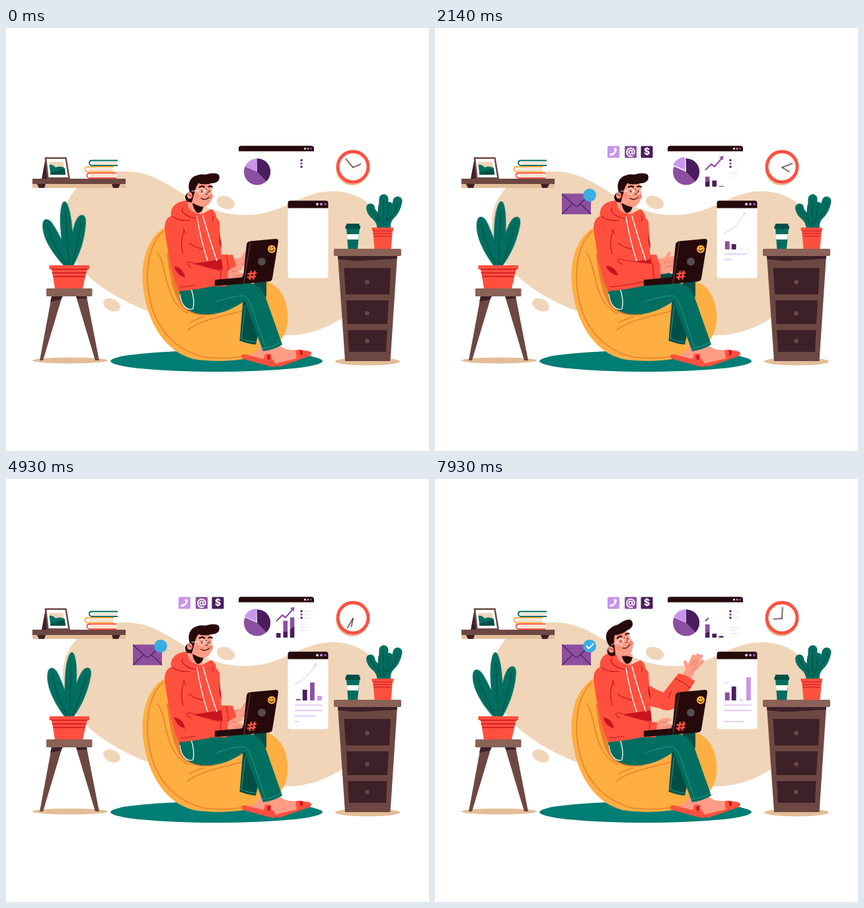
An HTML page without scripts that plays this animation: 640 by 640 pixels, repeating every 8000 ms.

```html
<!DOCTYPE html>
<html lang="en">
<head>
<meta charset="utf-8">
<title>Working from home</title>
<style>
html, body { margin: 0; width: 100%; height: 100%; overflow: hidden; background: #fff; }
svg { display: block; width: 100vw; height: 100vh; }
svg {
  --red: #ff503f; --deep: #c8141f; --skin: #ff9c85; --ink: #260a0b;
  --green: #006e60; --dark: #004f47; --brown: #6d4842; --wood: #3d2028;
  --tan: #e4bd98; --sand: #f0d5b8; --gold: #ffae42; --rust: #ec7f2b;
  --plum: #4a1d5e; --violet: #8c4f9f; --lilac: #c795ea; --pale: #e9d3fa;
}
.red { fill: var(--red); } .deep { fill: var(--deep); } .skin { fill: var(--skin); }
.ink { fill: var(--ink); } .green { fill: var(--green); } .dark { fill: var(--dark); }
.brown { fill: var(--brown); } .wood { fill: var(--wood); } .tan { fill: var(--tan); }
.sand { fill: var(--sand); } .gold { fill: var(--gold); } .white { fill: #fff; }
.plum { fill: var(--plum); } .violet { fill: var(--violet); } .lilac { fill: var(--lilac); }
.l { fill: none; stroke-linecap: round; stroke-linejoin: round; }
.fold { stroke: var(--deep); stroke-width: 1.2; }
.crease { stroke: var(--rust); stroke-width: 1.6; }
.vein { stroke: var(--dark); stroke-width: 1.2; }
.seam { stroke: #24998a; stroke-width: 1; }
.line { stroke: var(--ink); stroke-width: 1.2; }

.leaves, .hand, .pop, .mail, .slice, .arm, .elbow, .near, .head,
.grow, .trace, .tip, .tip2, .tick { animation: 8s linear infinite; }

/* Bars and text lines: --b to --g are lengths at the key times. */
.grow { fill: none; animation-name: grow; animation-timing-function: ease-in-out; }
@keyframes grow {
  0%, 7% { stroke-dasharray: 0 99px; }
  17.9% { stroke-dasharray: calc(var(--b, 0) * 1px) 99px; }
  36.6% { stroke-dasharray: calc(var(--c, 0) * 1px) 99px; }
  53.6% { stroke-dasharray: calc(var(--d, 0) * 1px) 99px; }
  69.6% { stroke-dasharray: calc(var(--e, 0) * 1px) 99px; }
  83.9% { stroke-dasharray: calc(var(--f, 0) * 1px) 99px; }
  99.1%, 100% { stroke-dasharray: calc(var(--g, 0) * 1px) 99px; }
}

.leaves { animation-name: sway; transform-origin: 96px 362px; }
@keyframes sway {
  0% { transform: rotate(-4.4deg); animation-timing-function: cubic-bezier(.37, 0, .63, 1); }
  43.75% { transform: rotate(5.8deg); animation-timing-function: cubic-bezier(.37, 0, .63, 1); }
  87.5% { transform: rotate(-4.4deg); animation-timing-function: cubic-bezier(.33, 0, .67, .33); }
  100% { transform: rotate(-2.6deg); }
}

.hand { animation-name: turn; transform-origin: 525px 211px; }
@keyframes turn {
  from { transform: rotate(var(--from)); }
  to { transform: rotate(var(--to)); }
}

.pop { animation-name: pop; transform-box: fill-box; transform-origin: center; }
.p1 { animation-name: pop1; } .p2 { animation-name: pop2; }
@keyframes pop { 0%, 7% { transform: scale(0); } 11.5%, 100% { transform: none; } }
@keyframes pop1 { 0%, 10% { transform: scale(0); } 14.5%, 100% { transform: none; } }
@keyframes pop2 { 0%, 13.5% { transform: scale(0); } 18.5%, 100% { transform: none; } }

.mail { animation-name: mail; }
@keyframes mail {
  0%, 17% { opacity: 0; transform: translateY(34px); animation-timing-function: ease-in-out; }
  27%, 100% { opacity: 1; transform: none; }
}
.tick { animation-name: tick; stroke-dasharray: 100 200; }
@keyframes tick { 0%, 67.5% { stroke-dashoffset: 101; } 72.5%, 100% { stroke-dashoffset: 0; } }

.slice { animation-name: slice; animation-timing-function: ease-in-out; }
@keyframes slice {
  0%, 9% { transform: none; }
  16.5%, 58% { transform: translate(-1.4px, -2.4px); }
  66%, 97% { transform: none; }
  100% { transform: translate(-.4px, -.7px); }
}

.trace { fill: none; animation-name: trace; stroke-dasharray: 100 200; }
@keyframes trace {
  0%, 8.4%, 85.1%, 96% { stroke-dashoffset: 100; }
  24.8%, 63.75% { stroke-dashoffset: 0; }
  85% { stroke-dashoffset: -100; }
  100% { stroke-dashoffset: 75; }
}
.tip { animation-name: tip; } .tip2 { animation-name: tip2; }
@keyframes tip { 0%, 23% { opacity: 0; } 25%, 84% { opacity: 1; } 85%, 100% { opacity: 0; } }
@keyframes tip2 { 0%, 23% { opacity: 0; } 25%, 80% { opacity: 1; } 82%, 100% { opacity: 0; } }

.arm { animation-name: arm; animation-timing-function: ease-in-out; }
.elbow { animation-name: elbow; animation-timing-function: ease-in-out; transform-origin: 350px 340px; }
@keyframes arm {
  0%, 2% { transform: translate(-55px, 16px); }
  9%, 55% { transform: translate(-63px, 16px); }
  62%, 80% { transform: translate(-55px, 16px); }
  83.9% { transform: translate(-45px, 13px); }
  95%, 100% { transform: none; }
}
@keyframes elbow {
  0%, 80% { transform: rotate(53deg); }
  83.9% { transform: rotate(46deg); }
  95%, 100% { transform: none; }
}

.near { animation-name: near; animation-timing-function: ease-in-out; transform-origin: 262px 370px; }
@keyframes near {
  0%, 2% { transform: translate(-5px, 1px) rotate(8deg); }
  10%, 20% { transform: translate(8px, -5px) rotate(-2deg); }
  28%, 55% { transform: none; }
  62%, 100% { transform: translate(-5px, 1px) rotate(8deg); }
}

.head { animation-name: head; animation-timing-function: ease-in-out; transform-origin: 285px 287px; }
@keyframes head { 0%, 63% { transform: none; } 77%, 100% { transform: rotate(-21deg); } }

text { fill: #fff; font: 800 14px Inter, Arial, sans-serif; text-anchor: middle; }
</style>
</head>
<body>
<svg viewBox="0 0 640 640" xmlns="http://www.w3.org/2000/svg">
  <!-- backdrop -->
  <g class="sand">
    <path d="M86 300C84 255 116 217 180 217C250 217 280 283 360 283C422 283 444 247 494 247C548 247 577 285 577 340C572 395 505 465 425 465C330 466 290 455 209 426C150 402 88 360 86 300Z"/>
    <ellipse cx="332.500" cy="264" rx="14" ry="9.500" transform="rotate(18 332.500 264)"/>
    <ellipse cx="160" cy="419" rx="13.500" ry="9" transform="rotate(25 160 419)"/>
  </g>
  <ellipse cx="318.500" cy="504" rx="160.500" ry="16" fill="#007d74"/>

  <!-- shelf -->
  <path class="tan" d="M40 236H181V242H40Z"/>
  <path class="brown" d="M40 228H181V236H40Z"/>
  <path class="wood" d="M47 236H60L58 242H50ZM160 236H173L170 242H162Z"/>
  <path class="wood" d="M60 196L54 228H64Z"/>
  <path class="brown" d="M58.500 195.500H91.500L97 228H62Z"/>
  <path class="white" d="M61.500 198H89.500L94 226H64.500Z"/>
  <path class="sand" d="M65 202.500H86.500L90 222H67.500Z"/>
  <path class="green" d="M65.500 207Q71 206 75 211Q80 208 88 211L90 222H67.500Z"/>
  <path class="dark" d="M67 219Q80 216 89 212L90 222H67.500Z"/>
  <g class="white" stroke-width="1.800">
    <path stroke="var(--green)" d="M169 200.500H130Q126 200.500 126 204T130 208H169"/>
    <path stroke="var(--gold)" d="M163 210H123.500Q119.500 210 119.500 213.500T123.500 217.500H163"/>
    <path stroke="var(--red)" d="M167 219.500H126.500Q122.500 219.500 122.500 223T126.500 227H167"/>
    <path stroke="var(--tan)" stroke-width=".8" d="M131 203.500H168M131 205.500H168M125 213H162M125 215H162M128 222.500H166M128 224.500H166"/>
  </g>

  <!-- stool and plant -->
  <ellipse class="tan" cx="97" cy="503" rx="57" ry="4.500"/>
  <path class="brown" d="M69 406H85L56 503H51ZM106 406H122L141 503H135Z"/>
  <path class="wood" d="M69 406H86L83 411L67 414ZM106 406H122L123 409L108 410Z"/>
  <rect x="61" y="394" width="69.500" height="12" rx="1.500" fill="#8a6257"/>
  <g class="leaves">
    <g class="green">
      <path d="M90 362C72 340 56 312 61 291C64 284 71 286 75 293C86 312 94 335 98 362Z"/>
      <path d="M94 362C100 335 103 302 114 288C121 281 128 285 126 297C122 325 112 345 101 362Z"/>
      <path d="M90 362C87 325 84 285 92 266Q96 258 100 266C108 287 104 330 102 362Z"/>
    </g>
    <path class="l vein" d="M67 297Q78 335 92 358M119 295Q110 335 100 358M96 277V358"/>
  </g>
  <path class="red" d="M69 364H123L116 394H74Z"/>
  <rect class="red" x="65.500" y="359" width="60.500" height="6" rx="1"/>
  <path class="l" stroke="var(--deep)" stroke-width="1.600" d="M69 365H123M70 370.500H121M72 376H119"/>

  <!-- cabinet -->
  <ellipse class="tan" cx="547" cy="504.500" rx="49" ry="6"/>
  <path class="brown" d="M502 344H592L581.500 504H513Z"/>
  <path class="wood" d="M502 345H592L591.500 349L530 352.500L502.500 350ZM511.500 363H582L580 403H514ZM515 412H579L577 448H516.500ZM517 457H576.500L575 490H519Z"/>
  <g class="brown"><circle cx="546.500" cy="384.500" r="3.300"/><circle cx="546.500" cy="431.500" r="3.300"/><circle cx="546.500" cy="473.500" r="3.300"/></g>
  <rect x="496" y="334" width="102" height="11" rx="2" fill="#8a6257"/>
  <path class="green" d="M515 303H535L532 334H517.500Z"/>
  <path class="dark" d="M513.500 299H536V304H513.500ZM515 296H534.500V299H515Z"/>
  <path class="white" d="M515.500 312H534L533 320H516.500Z"/>
  <g class="l" stroke="var(--green)" stroke-width="14">
    <path d="M570 302L571.500 258.500"/>
    <path stroke-width="13" d="M568 302Q567 291 560 285Q552 279 551.500 272"/>
    <path stroke-width="14" d="M575 302Q574 292 581 284Q590 276 592.500 262"/>
    <path stroke-width="10" d="M584 282L580 268"/>
  </g>
  <path class="l vein" d="M571 260V300M551 272Q556 285 566 292M593 264Q590 280 576 292M564 268L563 282Q565 290 567 298M579 268Q579 282 573 298"/>
  <path class="red" d="M555 306H585L582.500 334H557.500Z"/>
  <rect class="red" x="553.500" y="302" width="32.500" height="5" rx="1"/>
  <path class="l" stroke="var(--deep)" stroke-width="1.200" d="M556 307H584M556 311H583M557 315H582"/>

  <!-- clock -->
  <circle class="tan" cx="524" cy="213.500" r="24.500"/>
  <circle class="white" cx="525" cy="210" r="23" stroke="var(--red)" stroke-width="4.800"/>
  <path class="hand l line" style="--from:-40deg;--to:366.500deg" d="M525 211V194"/>
  <path class="hand l line" style="--from:67deg;--to:268deg" d="M525 211V198"/>

  <!-- contact icons -->
  <g class="pop">
    <rect class="lilac" x="261" y="178.500" width="18" height="18" rx="1.500"/>
    <path class="l" stroke="#fff" stroke-width="2.400" d="M273.300 183.500Q273.500 190.500 266 191.500"/>
    <path class="l" stroke="#fff" stroke-width="3.600" d="M272.500 183L273 185.200M266 191.500L268 191.200"/>
  </g>
  <g class="pop p1">
    <rect class="violet" x="287" y="178.500" width="18" height="18" rx="1.500"/>
    <text x="296" y="191.800">@</text>
  </g>
  <g class="pop p2">
    <rect class="plum" x="311.500" y="178.500" width="18" height="18" rx="1.500"/>
    <text x="320.500" y="192.300">$</text>
  </g>

  <!-- chart window -->
  <path class="ink" d="M352 186.500V182Q352 178.300 356 178.300H462Q466 178.300 466 182V186.500Z"/>
  <g class="lilac"><circle cx="452.500" cy="182.500" r="1.500" fill="#fff"/><circle cx="457" cy="182.500" r="1.500"/><circle class="violet" cx="461.500" cy="182.500" r="1.500"/></g>
  <circle class="violet" cx="380" cy="217.500" r="20"/>
  <path class="plum" d="M380 217.500L379.300 197.500A20 20 0 0 1 394 231.800Z"/>
  <path class="white" d="M380 217.500L379.300 196A21 21 0 0 0 360.500 209Z"/>
  <path class="lilac slice" d="M380 217.500L379.300 197.500A20 20 0 0 0 361.500 209.500Z"/>
  <g fill="none" stroke="var(--violet)" stroke-width="2.200">
    <path class="trace" pathLength="100" d="M409 215L418 206L423 209.500L434 197"/>
    <path class="tip violet" stroke="none" d="M430 195L436.500 193.800L435.500 200.500Z"/>
  </g>
  <mask id="bars" maskUnits="userSpaceOnUse" x="400" y="190" width="50" height="60">
    <g stroke="#fff" stroke-width="6.600">
      <path class="grow" style="--b:11;--c:20;--d:13;--e:1;--f:5;--g:20" d="M412.200 240V190"/>
      <path class="grow" style="--c:20.500;--d:28;--e:23;--f:3;--g:6" d="M422.700 240V190"/>
      <path class="grow" style="--c:2;--d:25;--e:36;--f:24;--g:2.500" d="M433 240V190"/>
    </g>
  </mask>
  <g mask="url(#bars)">
    <path class="violet" d="M405 190H440V240H405Z"/>
    <path class="plum" d="M405 235L415 231L426 231L440 220V240H405Z"/>
  </g>
  <path class="plum" d="M445.500 198.500h3v3h-3zM445.500 208.500h3v3h-3z"/>
  <path class="violet" d="M445.500 203.500h3v3h-3z"/>
  <g stroke="var(--pale)" stroke-width=".9">
    <path class="grow" style="--b:5;--c:11;--d:11;--e:11;--f:6;--g:11" d="M450 200H465"/>
    <path class="grow" style="--c:6;--d:8;--e:8;--f:8;--g:1" d="M450 205H465"/>
    <path class="grow" style="--c:4;--d:10;--e:10;--f:10;--g:11" d="M450 210H465"/>
    <path class="grow" style="--b:13;--c:13;--d:6;--e:14;--f:3" d="M446 219.500H462"/>
    <path class="grow" style="--c:6;--d:14;--e:3;--f:14;--g:14" d="M446 225.500H462"/>
    <path class="grow" style="--d:6;--e:13;--f:5;--g:8" d="M446 229.500H462"/>
    <path class="grow" style="--f:6;--g:14" d="M446 234H462"/>
  </g>

  <!-- report window -->
  <rect class="white" x="426.500" y="261" width="61" height="117.500" rx="4"/>
  <path class="ink" d="M426.500 272.500V265Q426.500 261.300 430 261.300H484Q487.500 261.300 487.500 265V272.500Z"/>
  <circle cx="471" cy="266.500" r="2" fill="var(--pale)"/><circle class="lilac" cx="477" cy="266.500" r="2"/><circle class="violet" cx="483" cy="266.500" r="2"/>
  <g fill="none" stroke="#dcc0f2" stroke-width="1">
    <path class="trace" pathLength="100" d="M437 310.500Q458 303 468.500 279.500"/>
    <path class="tip2" d="M465.500 281.500L468.800 279L469.800 283"/>
  </g>
  <g stroke-width="6.800">
    <path class="grow" stroke="var(--violet)" style="--b:11;--c:14;--d:.5;--e:4;--f:15;--g:12" d="M442.200 335V285"/>
    <path class="grow" stroke="var(--plum)" style="--b:.5;--c:17;--d:26;--e:6.500;--f:1.500;--g:21" d="M452.200 335V285"/>
    <path class="grow" stroke="var(--violet)" style="--c:.5;--d:17;--e:37;--f:19;--g:.5" d="M463.400 335V285"/>
    <path class="grow" stroke="var(--lilac)" style="--c:.5;--d:.5;--e:13;--f:43;--g:35" d="M474.400 335V285"/>
  </g>
  <g stroke="var(--pale)" stroke-width="2.400">
    <path class="grow" style="--b:28;--c:42;--d:42;--e:42;--f:42;--g:42" d="M437 342H480"/>
    <path class="grow" style="--c:26;--d:42;--e:42;--f:42;--g:42" d="M437 350.300H480"/>
    <path class="grow" style="--d:20;--e:42;--f:22" d="M437 358.700H480"/>
    <path class="grow" style="--e:12;--f:38;--g:31" d="M437 367H480"/>
  </g>

  <!-- mail -->
  <g class="mail">
    <path class="violet" d="M192 250.500H236V281.800H192Z"/>
    <path class="l" stroke="var(--plum)" stroke-width="1.200" d="M192.500 251L211 268.500Q214 271 217 268.500L235.500 251M192.500 281L208 266M235.500 281L220 266"/>
    <circle cx="234" cy="252.800" r="9.800" fill="#38aee4"/>
    <path class="tick" fill="none" stroke="#fff" stroke-width="2" pathLength="100" d="M229 252.500L232.500 256.500L240 249"/>
  </g>

  <!-- bean bag -->
  <path class="gold" d="M240 302C206 322 203 372 209 403C217 450 242 490 284 501C315 506 352 504 380 497C416 484 428 460 426 432C424 404 411 388 392 383L262 398Z"/>
  <path d="M243 340C247 370 251 396 262 416C272 432 290 437 313 434L362 414L270 395L250 340Z" fill="var(--rust)"/>
  <path class="l crease" d="M238 307C213 330 210 375 218 412C227 453 254 487 300 498Q345 503 385 491M229 340C240 352 240 385 252 408Q260 424 276 432M275 457C292 442 330 436 358 428M278 446Q288 440 300 437"/>

  <!-- far leg and feet -->
  <path class="skin" d="M364 496Q380 493 385 480L400 486L406 500L396 508Z"/>
  <path class="red" d="M356 496Q358 492 366 495L390 501L392 493Q400 491 405 498L410 510Q408 514 400 512L360 501Q355 499 356 496Z"/>
  <path class="deep" d="M395 496L400 494L399 502L396 502Z"/>
  <path class="dark" d="M359 408L353.500 473Q366 478 378 479L394 404V384L380 380Z"/>
  <path class="l seam" d="M362 420L356 470M355 469Q366 475 378 475"/>
  <path class="skin" d="M400 484L414 480Q420 487 432 487L458 488L461 494L412 512L402 500Z"/>
  <path class="red" d="M410 507L440 500L438 488Q444 485 450 488L461 490Q464 494 458 497L415 512Q408 513 410 507Z"/>
  <path class="deep" d="M444 488L449 487.500L449 494L446 495Z"/>

  <!-- far arm -->
  <g class="arm">
    <path class="red" d="M310 303Q332 319 349 324L364 345Q352 354 340 347L310 340Z"/>
    <g class="elbow">
      <g class="l" stroke="var(--skin)" stroke-width="5">
        <path stroke-width="14" stroke-linecap="butt" d="M379 302L386 290"/>
        <path d="M383 290L378.500 277M384 284L391 268M387 284L397.500 266.500M390 286L403 268M391 290L404.500 276"/>
        <path stroke-width="13" d="M386 289L388 286"/>
      </g>
      <path class="l" stroke="#d9604f" stroke-width=".8" d="M389 281L393 273M392 283L398 275M388 290Q392 289 394 285"/>
      <path class="red" d="M340 330L368.500 294Q382 297 393.500 306L373 337Q363 351 349 350Z"/>
      <path class="l fold" d="M363 302Q374 306 386 316M353 331L357 322"/>
    </g>
  </g>

  <!-- near leg -->
  <path class="dark" d="M330 372L350 369L375 378L360 392L330 388Z"/>
  <path class="green" d="M262 400C262 424 282 436 312 433C336 430 350 420 361 413L389 489Q405 487 418 479L393 408C387 388 368 382 340 383L268 388Z"/>
  <path class="l seam" d="M318 414Q345 405 360 405Q367 409 371 420L392 481M388 485Q402 483 416 476"/>
  <path class="l" stroke="#fff" stroke-width="1.300" d="M263 403C265 420 274 428 283 425Q286 412 280 394"/>

  <!-- torso -->
  <path class="red" d="M252 284C242 286 238 296 241 312C246 345 252 378 262 398Q296 396 330 386L326 350L323 294Q321 285 306 283Z"/>
  <path class="deep" d="M285 356L326 350L328 366L300 364ZM322 309L325 322L326.500 334L323 325Z"/>
  <path class="skin" d="M277 258L299 266L296 284Q284 288 273 280Z"/>
  <path class="ink" d="M282 265L299 270Q297 279 290 280Q284 276 282 265Z"/>
  <path class="red" d="M250 286C247 270 259 261 276 261C273 270 278 279 295 282Q310 274 311 274Q320 280 318 291C300 296 262 296 250 286Z"/>
  <path class="l fold" d="M252 285Q262 293 278 291M268 272Q264 276 270 281Q278 288 292 288M270 305C265 318 264 330 268 342M268 305L272 311M277 326Q288 333 300 335M312 284Q315 288 312 292M264 392Q296 389 328 381"/>
  <path class="l" stroke="#fff" stroke-width="1.400" d="M289 286Q295 322 305 352M298 284Q308 320 319 352"/>

  <!-- near arm -->
  <g class="near">
    <path class="skin" d="M338 357L347 349Q360 345 362 350L354 354L363 357L361 367L350 372L338 373Z"/>
    <path class="red" d="M257 366C262 352 276 349 288 352L329 357L340 356L341 379L300 384L266 384Z"/>
    <path class="deep" d="M258 360Q272 360 277 375Q262 372 258 360Z"/>
    <path class="l fold" d="M276 352Q281 348 288 352L329 357L331 380M277 354L283 358"/>
    <path class="l" stroke="#d9604f" stroke-width=".8" d="M346 355L354 354M350 362L360 360"/>
  </g>

  <!-- laptop -->
  <path class="ink" d="M316 381L360 377V387L317 390Q315 390 316 381ZM364 327Q365 323 370 322.500L408 319Q412.500 319 412 323L403 379Q402 383 398 383.500L358 387Z"/>
  <path class="l" stroke="#6b4d4d" stroke-width="1" d="M369.500 324L360 386"/>
  <circle cx="387" cy="353.500" r="6" fill="#574a50"/>
  <circle class="gold" cx="402" cy="334.500" r="6"/>
  <path class="l line" stroke-width="1" d="M398.500 335.500Q402 340 405.500 335M400.300 332V333M403.600 331.500V332.500"/>
  <path fill="none" stroke="var(--red)" stroke-width="2.400" d="M371 367.500L368.500 381M376.500 367L374 380.500M365.500 372.300L379 370.800M365 377.200L378 375.700"/>

  <!-- head -->
  <g class="head">
    <path class="skin" d="M282 236L309 235Q313 246 312 256Q309 268 300 271Q288 270 279 261Z"/>
    <path class="ink" d="M275 263C269 258 270 251 278 248C274 238 278 225 289 223C295 220 301 223 305 221Q317 218 322 222C325 230 320 235 311 235Q300 238 291 235Q286 242 285 250L281 264Z"/>
    <ellipse class="skin" cx="278" cy="253.500" rx="4" ry="5"/>
    <path class="l fold" d="M276 252Q279 251 280 255"/>
    <circle cx="309.500" cy="255" r="3.500" fill="#ff7f72"/><circle cx="289" cy="255" r="3.500" fill="#ff7f72" opacity=".5"/>
    <path class="l line" style="stroke-width:2.400" d="M293 240.800Q297 238.500 300 240.500M306.500 240Q310 238.500 312 240.500"/>
    <path class="l line" d="M303 244L306 251L302.500 251.500M295 257.500Q301 261.500 307 256.500M296 246Q296.500 247 296.500 248M307.500 246L307.500 248"/>
    <g class="l" stroke="#fff" stroke-width=".9"><circle cx="295.500" cy="247" r="4.600"/><path d="M291 246L281 247M300 246L304 246M304 246Q303 251 308 251.500Q312 250 311.500 246"/></g>
  </g>
</svg>
</body>
</html>
```
